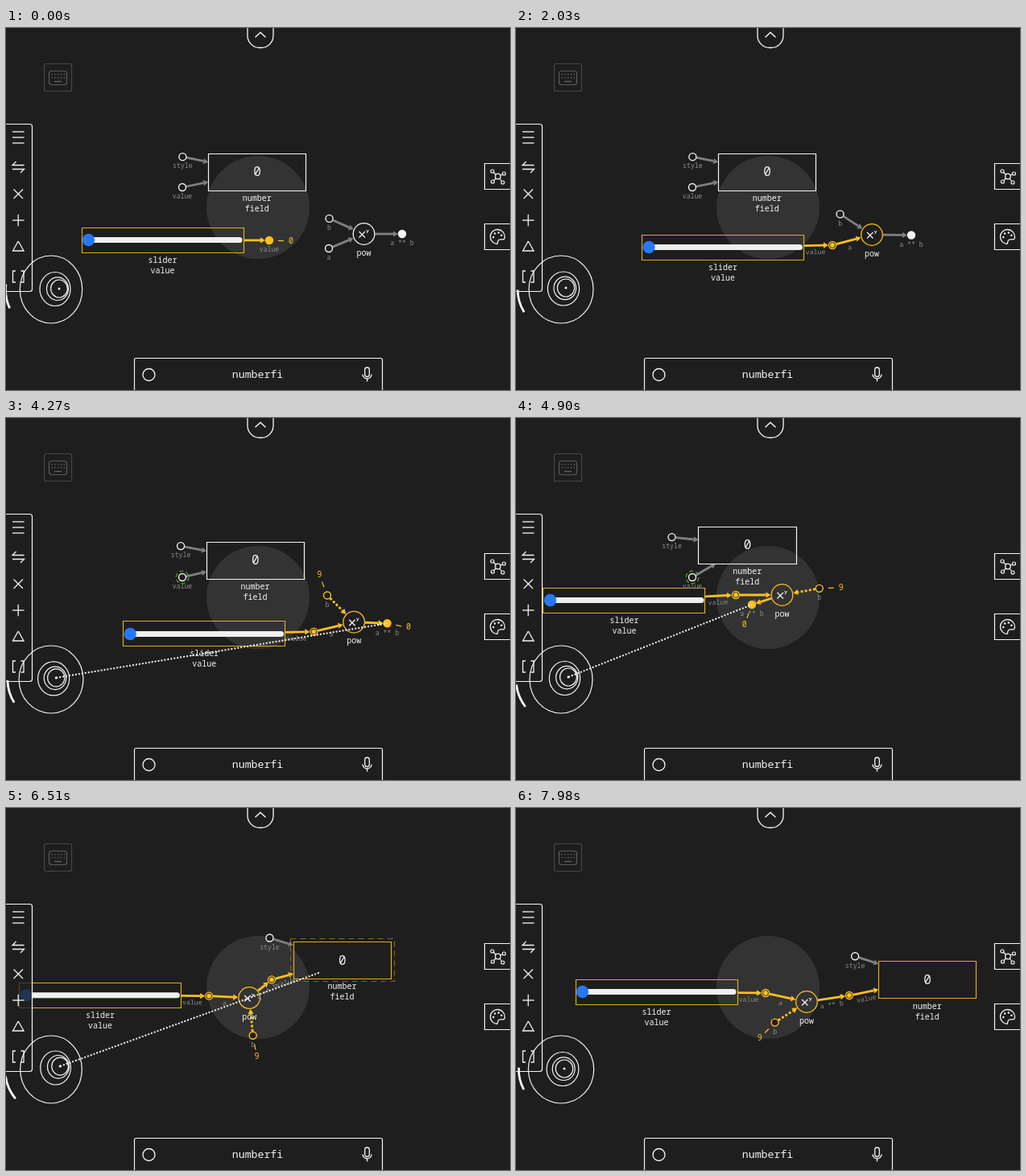
These frames come from a looping animation (626x450 px, 8 s). An HTML page with a canvas:

```html
<!DOCTYPE html>
<html lang="en">
<head>
<meta charset="utf-8">
<title>Node graph</title>
<style>
html, body { margin: 0; width: 100%; height: 100%; overflow: hidden; background: #1e1e1e; }
canvas { display: block; }
</style>
</head>
<body>
<canvas id="stage" width="626" height="450"></canvas>
<script>
const ctx = document.getElementById('stage').getContext('2d');
const BG = '#1e1e1e', WHITE = '#f4f4f4', GOLD = '#fbc021', EDGE = '#dfab22', GRAY = '#808080',
      LABEL = '#8c8c8c', GREEN = '#4b9e35', ACID = '#f4f62a', DIM = '#454545';
const LOOP = 8000, MERGE_A = 1480, MERGE_OUT = 5180;
const SLIDER = [201, 31], FIELD = [121.5, 46];

// Resting poses, each held over a span of time; a pose states only what moved.
// b, style, zero and turn are directions in degrees, the rest are centres.
const poses = [
  { hold: [0, 640], slider: [194.5, 263.5], value: [327, 264], pow: [444.5, 256], out: [492, 256],
    field: [312, 179], b: 204, style: 191.5, zero: 2, stick: [66, 324], turn: 171 },
  { hold: [1260, 1260], slider: [248.5, 273.5], value: [383, 272], zero: 86, stick: [69, 323] },
  { hold: [1900, 4130], slider: [257, 272.5], value: [393, 270], pow: [442, 257], out: [491, 257.5],
    b: 213, zero: 2, stick: [62, 323], turn: 164 },
  { hold: [4900, 4900], slider: [134.5, 226.5], value: [273, 220], pow: [330.5, 220], out: [293, 232],
    field: [287.5, 158], b: 350, style: 186, zero: 110, stick: [65, 322], turn: 158 },
  { hold: [5180, 5180], slider: [110, 235], value: [248, 229], pow: [300, 228], out: [222, 198] },
  { hold: [5810, 5930], slider: [58, 256.5], value: [193, 254.5], pow: [242, 244.5], out: [243, 199],
    field: [319, 160.5], b: 373, style: 193, zero: 204, stick: [62, 320], turn: 146.5 },
  { hold: [7070, 7070], slider: [172.5, 210.5], value: [308, 214], pow: [359, 228], out: [412, 227],
    field: [511, 216.5], b: 512, style: 201, stick: [72, 322], turn: 165 },
  { hold: [7980, LOOP], slider: [174.5, 228.5], value: [310, 230], pow: [361, 241], out: [414, 233],
    field: [511, 213.5], b: 507, style: 198, stick: [60, 324], turn: 167 }
];
poses.forEach((p, i) => poses[i] = { ...poses[i - 1], ...p });

const mix = (a, b, s) => Array.isArray(a) ? a.map((v, i) => mix(v, b[i], s)) : a + (b - a) * s;

function poseAt(t) {
  const i = poses.findIndex(p => t <= p.hold[1]), next = poses[i], prev = poses[i - 1] || next;
  const start = prev.hold[1], end = next.hold[0];
  const u = t >= end ? 1 : (t - start) / (end - start), s = u * u * (3 - 2 * u);
  return Object.fromEntries(Object.keys(next).map(k => [k, mix(prev[k], next[k], s)]));
}

const polar = (p, deg, r) => [p[0] + r * Math.cos(deg * Math.PI / 180), p[1] + r * Math.sin(deg * Math.PI / 180)];
const angle = (a, b) => Math.atan2(b[1] - a[1], b[0] - a[0]) * 180 / Math.PI;
const toward = (a, b, r) => polar(a, angle(a, b), r);

// Where the ray from the centre of a box to p leaves the box
function boxExit(c, [w, h], p) {
  const dx = p[0] - c[0], dy = p[1] - c[1];
  const k = Math.min(w / 2 / Math.abs(dx), h / 2 / Math.abs(dy));
  return [c[0] + dx * k, c[1] + dy * k];
}

function stroke(color, width = 1.3, dash = []) {
  ctx.strokeStyle = color;
  ctx.lineWidth = width;
  ctx.setLineDash(dash);
  ctx.stroke();
  ctx.setLineDash([]);
}

function line(points, color = WHITE, width = 1.3, dash) {
  ctx.beginPath();
  points.forEach(p => ctx.lineTo(...p));
  stroke(color, width, dash);
}

function circle(x, y, r, color, fill, width, dash) {
  ctx.beginPath();
  ctx.arc(x, y, r, 0, 7);
  if (fill) { ctx.fillStyle = fill; ctx.fill(); }
  if (color) stroke(color, width, dash);
}

function ellipse(x, y, rx, ry) {
  ctx.beginPath();
  ctx.ellipse(x, y, rx, ry, 0, 0, 7);
  stroke(WHITE, 1.2);
}

function box(x, y, w, h, color = WHITE, fill, r = 0, dash) {
  const snap = v => Math.floor(v) + .5, left = snap(x), top = snap(y);
  ctx.beginPath();
  ctx.roundRect(left, top, snap(x + w) - left, snap(y + h) - top, r);
  if (fill) { ctx.fillStyle = fill; ctx.fill(); }
  stroke(color, 1.2, dash);
}

const centredBox = ([x, y], [w, h], color, dash) => box(x - w / 2, y - h / 2, w, h, color, null, 0, dash);

function text(s, x, y, size = 10, color = WHITE, rot = 0) {
  ctx.save();
  ctx.translate(x, y);
  ctx.rotate(rot * Math.PI / 180);
  ctx.font = `${size}px "Noto Sans Mono", "DejaVu Sans Mono", monospace`;
  ctx.textAlign = 'center';
  ctx.textBaseline = 'middle';
  ctx.fillStyle = color;
  ctx.fillText(s, 0, 0);
  ctx.restore();
}

function title(words, x, y) {
  words.forEach((word, i) => text(word, x, y + 13 * i));
}

const pinLabel = (s, p) => text(s, p[0], p[1] + 12, 8.2, LABEL);

// Label running alongside a link
function linkLabel(s, a, b) {
  const rot = angle(a, b), p = polar(mix(a, b, .47), rot + 90, 8.5);
  text(s, ...p, 8.2, LABEL, rot);
}

function arrow(a, b, color = GRAY, dash) {
  const deg = angle(a, b), neck = polar(b, deg, -6);
  line([a, neck], color, 2.8, dash);
  ctx.beginPath();
  [b, polar(neck, deg + 90, 3.6), polar(neck, deg - 90, 3.6)].forEach(p => ctx.lineTo(...p));
  ctx.fillStyle = color;
  ctx.fill();
}

const pin = (p, color = WHITE, fill = BG) => circle(...p, 4.5, color, fill, 1.4);
const ring = (p, color = GREEN) => circle(...p, 7.8, color, null, 1.3, [5, 3.2]);
function joined(p) {
  pin(p, GOLD);
  circle(...p, 2.9, null, GOLD);
}

function datum(s, p, deg) {
  line([polar(p, deg, 11), polar(p, deg, 18)], GOLD, 1.2);
  text(s, ...polar(p, deg, 27), 10, GOLD);
}

function drawGraph(t) {
  const pose = poseAt(t), { slider, value, pow, out, field, stick } = pose;
  const between = (from, to) => t >= from && t < to;
  const linked = t >= MERGE_A, wired = t >= MERGE_OUT, powered = t >= 3550, editing = between(2800, 3600);
  const drag1 = between(640, MERGE_A), drag2 = between(4140, MERGE_OUT), drag3 = between(5900, 7500);
  const a = [401, 274], input = [219, 198];
  const b = polar(pow, pose.b, 47), style = polar(field, pose.style, 94.5);
  if (editing) stick[0] += 7 * Math.sin((t - 2800) / 800 * Math.PI);

  // Links
  const sOut = boxExit(slider, SLIDER, value), vIn = toward(value, sOut, 5);
  arrow(sOut, vIn, editing ? '#8a6d24' : GOLD);
  if (linked) {
    const from = toward(value, pow, 5), to = toward(pow, value, 14);
    arrow(from, to, GOLD);
    linkLabel('value', sOut, vIn);
    linkLabel('a', from, to);
  } else {
    arrow(toward(a, pow, 5), toward(pow, a, 14));
    pinLabel('value', value);
    pinLabel('a', a);
  }
  const bColor = editing ? ACID : powered ? GOLD : GRAY;
  arrow(toward(b, pow, 5), toward(pow, b, 14), bColor, t >= 2800 ? [3, 2.2] : []);
  const oFrom = toward(pow, out, 14), oTo = toward(out, pow, 5);
  arrow(oFrom, oTo, powered ? GOLD : editing ? '#555' : GRAY);
  arrow(toward(style, field, 5), boxExit(field, FIELD, style));
  const source = wired ? out : input, fieldEnd = boxExit(field, FIELD, source);
  arrow(toward(source, fieldEnd, 5), fieldEnd, wired ? GOLD : GRAY);

  // Slider
  const [sx, sy] = slider, knob = sx - 92;
  centredBox(slider, SLIDER, EDGE);
  ctx.lineCap = 'round';
  line([[knob, sy], [sx + 95.5, sy]], '#f0eeee', 7);
  ctx.lineCap = 'butt';
  circle(knob, sy, 7.7, null, '#2678f4');
  title(['slider', 'value'], sx, sy + 25.2);

  // Number field
  const [fx, fy] = field;
  centredBox(field, FIELD, wired ? EDGE : WHITE);
  if (drag3) centredBox(field, FIELD.map(v => v + 7), '#80661f', [7, 5]);
  text('0', fx, fy + .7, 16);
  title(['number', 'field'], fx - .3, fy + 33.2);

  // Pow
  const [x, y] = pow;
  circle(x, y, 13.3, linked ? GOLD : WHITE);
  line([[x - 6, y - 3], [x + 1.5, y + 4.5]]);
  line([[x + 1.5, y - 3], [x - 6, y + 4.5]]);
  line([[x + 3, y - 5], [x + 4.5, y - 3]], WHITE, 1);
  line([[x + 6, y - 5], [x + 3.7, y - .8]], WHITE, 1);
  text('pow', x, y + 23.8);

  // Pins
  pin(style);
  pinLabel('style', style);
  pin(b, t < 2800 ? WHITE : bColor);
  pinLabel('b', b);
  if (wired) {
    joined(out);
    linkLabel('a ** b', oFrom, oTo);
    linkLabel('value', toward(out, fieldEnd, 5), fieldEnd);
    if (!drag3 && t < 5900) ring(out, '#777');
  } else {
    const color = powered ? GOLD : editing ? GRAY : WHITE;
    pin(out, color, color);
    pinLabel('a ** b', out);
    pin(input);
    pinLabel('value', input);
  }
  if (linked) joined(value);
  else { pin(value, GOLD, GOLD); pin(a); }
  if (drag1) { [input, a, b, out].forEach(p => ring(p)); ring(value, '#887030'); }
  if (drag2) ring(input);
  if (editing) ring(b, '#777a2c');

  // Data; the one on b trails a little as b swings round
  if (!linked) datum('0', value, pose.zero);
  if (powered) datum('9', b, .87 * pose.b + 53);
  if (between(3550, 6000)) datum('0', out, pose.zero);

  drawPanels(editing);
  const grip = drag1 ? value : drag2 ? out : drag3 ? [fx - 29, fy + 15.5] : null;
  if (grip) line([stick, grip], WHITE, 2, [2, 2]);
  drawStick(stick, pose.turn, editing);
}

// Rings bunch up toward the stick
function drawStick([x, y], deg, editing) {
  const home = [56, 325], dx = x - home[0], rad = Math.PI / 180;
  ellipse(...home, 42 - .33 * dx, 42);
  ellipse(...mix(home, [x, y], .5), 20.5 - .15 * dx, 21);
  ellipse(...mix(home, [x, y], .8), 14.3 - .08 * dx, 14.3);
  ellipse(x, y, 11 - .06 * dx, 11);
  circle(x, y, 1.5, null, WHITE);
  ctx.beginPath();
  ctx.arc(...home, 50 + .65 * dx, (deg - 15.5) * rad, (deg + 15.5) * rad);
  stroke(editing ? ACID : WHITE, 2.8);
}

function drawPanels(editing) {
  // Tool column
  box(-6, 119, 38, 208, WHITE, 'rgba(30,30,30,.75)', 3);
  [129, 136, 143].forEach(y => line([[8, y], [22.5, y]]));
  line([[22.5, 170.5], [8, 170.5], [12.5, 166]]);
  line([[8, 175.5], [22.5, 175.5], [18, 180]]);
  line([[9.5, 200.5], [21, 212]]);
  line([[21, 200.5], [9.5, 212]]);
  line([[8, 239], [22.5, 239]]);
  line([[15.2, 231.8], [15.2, 246.3]]);
  line([[15.2, 265], [22, 277], [8.5, 277], [15.2, 265]], editing ? ACID : WHITE);
  if (editing) box(3, 260, 24, 24, ACID);
  line([[12, 302], [8.5, 302], [8.5, 316], [12, 316]]);
  line([[18.5, 302], [22, 302], [22, 316], [18.5, 316]]);

  // Top tab
  ctx.beginPath();
  ctx.roundRect(300, -20, 32, 44.5, 15);
  ctx.fillStyle = BG;
  ctx.fill();
  stroke(WHITE);
  line([[309.5, 11.5], [316, 5.5], [322.5, 11.5]], WHITE, 1.5);

  // Keyboard button
  box(47, 44, 34, 34, DIM, null, 2);
  box(53, 53, 22, 17, '#5a5a5a', null, 3);
  ctx.fillStyle = '#666';
  for (let i = 0; i < 5; i++)
    for (let j = 0; j < 2; j++) ctx.fillRect(56.5 + i * 3.8, 57 + j * 4, 1.3, 1.3);
  line([[60, 66.5], [69, 66.5]], '#666', 1.2);

  // Side buttons
  box(594, 168, 40, 32, WHITE, BG);
  const hub = [611, 184.5];
  [[604, 178], [618.5, 181], [604.5, 191], [617, 192]].forEach(p => {
    line([hub, p], WHITE, 1.2);
    circle(...p, 2, WHITE, BG, 1.2);
  });
  circle(...hub, 3.3, WHITE, BG);
  box(594, 243, 40, 32, WHITE, BG);
  ctx.beginPath();
  ctx.arc(610.5, 259.5, 9, 1.6, 6.5);
  ctx.bezierCurveTo(618, 265, 613, 261, 611.5, 264);
  ctx.quadraticCurveTo(610.5, 266, 610.3, 268.5);
  stroke(WHITE);
  for (let i = 0; i < 4; i++) circle(...polar([610.5, 259.5], 175 + 55 * i, 5.2), 1.2, null, WHITE);

  // Search bar
  box(159, 410, 308, 50, WHITE, BG, 2);
  circle(177.5, 431, 7.5, WHITE);
  text('numberfi', 312.5, 431, 13.2);
  ctx.beginPath();
  ctx.roundRect(445.7, 422, 5.6, 11.5, 2.8);
  stroke(WHITE);
  ctx.beginPath();
  ctx.arc(448.5, 430.5, 5.5, 0, Math.PI);
  stroke(WHITE);
  line([[448.5, 436], [448.5, 439.5]]);
}

function frame() {
  ctx.fillStyle = BG;
  ctx.fillRect(0, 0, 626, 450);
  circle(313, 223, 64, null, '#333');
  drawGraph(performance.now() % LOOP);
  requestAnimationFrame(frame);
}
frame();
</script>
</body>
</html>
```
